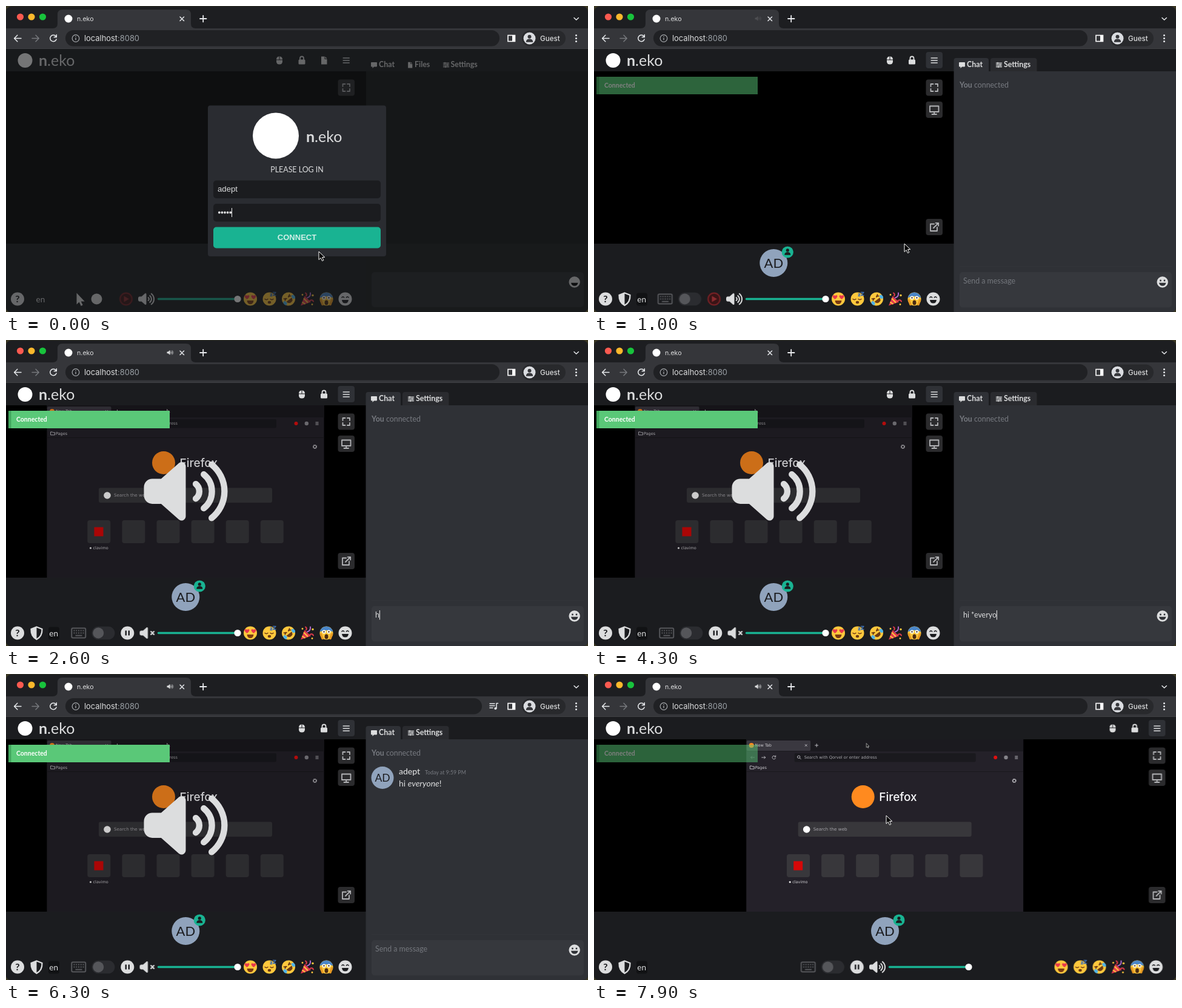
Recreate the animation shown at these times as an HTML page. Size 960 by 506 pixels, loop 8 s.

```html
<!DOCTYPE html>
<html lang="en">
<head>
<meta charset="utf-8">
<title>n.eko</title>
<style>
html, body { margin: 0; height: 100%; overflow: hidden; background: #1a1b1e; }
svg.stage { display: block; width: 100vw; height: 100vh; }
text { font: 12.4px Lato, sans-serif; fill: #dcddde; white-space: pre; }
.ui { font-family: Inter, sans-serif; }
.arial { font-family: "Liberation Sans", Arial, sans-serif; }
.ff text { font: 6.5px "DejaVu Sans", sans-serif; fill: #d0cfd3; }
.b { font-weight: 700; }
.line { fill: none; stroke-linecap: round; stroke-linejoin: round; }

.pre, .live, .video, .mute, .loud, .wait, .chat, .right, .mid, .keys, .vol,
.audio, .media, .sent, .arrow, .hand { animation: 8s step-end infinite; }
.pre { animation-name: pre; }
.live { animation-name: live; }
.video { animation-name: video; }
.wait { animation-name: wait; }
.mute { animation-name: mute; }
.loud { animation-name: loud; }
.chat { animation-name: chat; }
.right { animation-name: right; }
.mid { animation-name: mid; }
.keys { animation-name: keys; }
.vol { animation-name: vol; }
.audio { animation-name: audio; }
.media { animation-name: media; }
.sent { animation-name: sent; }
.arrow { animation-name: arrow; }
.hand { animation-name: hand; }
.toast { animation: toast 8s linear infinite; }
.cursor { animation: move 8s ease-in-out infinite; }

@keyframes pre { 0% { opacity: 1 } 10.625%, 100% { opacity: 0 } }
@keyframes live { 0% { opacity: 0 } 10.625%, 100% { opacity: 1 } }
@keyframes video { 0% { opacity: 0 } 18.125%, 100% { opacity: 1 } }
@keyframes wait { 0% { opacity: 1 } 18.125%, 100% { opacity: 0 } }
@keyframes mute { 0%, 95.625%, 100% { opacity: 0 } 18.125% { opacity: 1 } }
@keyframes loud { 0%, 95.625%, 100% { opacity: 1 } 18.125% { opacity: 0 } }
@keyframes chat { 0% { opacity: 1 } 89.375%, 100% { opacity: 0 } }
@keyframes right { 0% { transform: none } 89.375%, 100% { transform: translateX(367.5px) } }
@keyframes mid { 0% { transform: none } 89.375%, 100% { transform: translateX(183.7px) } }
@keyframes keys {
  0% { transform: translateX(-2.5px) }
  18.125% { transform: none }
  89.375% { transform: translateX(235px) }
  95.625%, 100% { transform: translateX(233.5px) }
}
@keyframes vol {
  0% { transform: none }
  89.375% { transform: translateX(235px) }
  95.625%, 100% { transform: translateX(236px) }
}
@keyframes audio {
  0% { opacity: 0 } 11.875% { opacity: .15 } 13.125% { opacity: 1 }
  36.875% { opacity: 0 } 68.125%, 100% { opacity: 1 }
}
@keyframes media { 0%, 85.625%, 100% { opacity: 0 } 68.125% { opacity: 1 } }
@keyframes sent { 0% { opacity: 0 } 68.125%, 100% { opacity: 1 } }
@keyframes toast { 0%, 11.25%, 100% { opacity: 0 } 13.75%, 97.5% { opacity: 1 } }
@keyframes arrow { 0%, 81.25%, 91.25%, 100% { opacity: 1 } 31.25%, 86.875% { opacity: 0 } }
@keyframes hand { 0%, 91.25%, 100% { opacity: 0 } 86.875% { opacity: 1 } }
@keyframes move {
  0% { transform: translate(516px, 406px) }
  3.5%, 15% { transform: translate(512px, 393px) }
  27%, 81.25% { transform: translate(640px, 452px) }
  87.5%, 90.2% { transform: translate(565px, 95px) }
  94.5%, 100% { transform: translate(482px, 234px) }
}
</style>
</head>
<body>
<svg class="stage" viewBox="0 0 960 506" preserveAspectRatio="none">
<defs>
  <path id="cone" d="M320 64c0-12.6-7.4-24-18.9-29.2s-25-3.1-34.4 5.3L131.8 160H64c-35.3 0-64 28.7-64 64v64c0 35.3 28.7 64 64 64h67.8l134.9 119.9c9.4 8.4 22.9 10.4 34.4 5.3S320 460.6 320 448z"/>
  <g id="speaker" fill="#dcddde" stroke="#dcddde" stroke-width="0">
    <use href="#cone"/>
    <path class="line" stroke-width="48" d="M397 200a72 72 0 0 1 0 112M458 126a167 167 0 0 1 0 260M518 51a263 263 0 0 1 0 410"/>
  </g>
  <g id="muted" fill="#dcddde" stroke="#dcddde" stroke-width="0">
    <use href="#cone"/>
    <path class="line" stroke-width="52" d="M442 199l114 114m0-114L442 313"/>
  </g>
  <g id="person"><circle cy="-2.4" r="2.6"/><path d="M-5 5.4q0-4.6 5-4.6t5 4.6z"/></g>
  <g id="mouse"><rect x="-5" y="-6.5" width="10" height="13" rx="4.5"/><path d="M-5-1H5M0-6.5V-1" stroke="#1a1b1e"/></g>
  <g id="lock"><rect x="-5.5" y="-1.5" width="11" height="8" rx="1.5"/><path class="line" d="M-3-1v-2.5a3 3 0 0 1 6 0V-1" stroke="#dcddde" stroke-width="1.8"/></g>
  <path id="file" d="M-4.5-6.5H1V-2H5V6.5H-4.5zM2-6.5L5-3H2z"/>
  <path id="menu" class="line" d="M-5-4H5M-5 0H5M-5 4H5" stroke="#dcddde" stroke-width="1.6"/>
  <path id="bubble" d="M-4-4.5h8q1 0 1 1v5.500q0 1-1 1H0L-2.500 5.500V3H-4q-1 0-1-1v-5.500q0-1 1-1z"/>
  <path id="sliders" class="line" d="M-4.500-3h9m-9 3h9m-9 3h9M-2-4v2M2-1v2M-1 2v2" stroke="#dcddde" stroke-width="1.400"/>
  <circle id="face" r="11" fill="#ffc83d"/>
  <g id="grin">
    <path d="M-5.500 1.500H5.500q-.5 5.500-5.500 5.500T-5.500 1.500z"/>
    <path class="line" stroke-width="1.600" d="M-5.500-2.500q1.800-2.500 3.600 0M1.900-2.500q1.800-2.500 3.600 0"/>
  </g>
  <path id="heart" d="M0 4.500C-6 .5-4.500-4 0-1.500 4.500-4 6 .5 0 4.500z" fill="#e8384b"/>
</defs>

<rect width="960" height="506" fill="#3b3824"/>
<rect width="960" height="506" y=".5" rx="9" fill="#1d1e21"/>

<!-- browser chrome -->
<circle cx="23.500" cy="18" r="5.600" fill="#fb5a50"/>
<circle cx="42" cy="18" r="5.600" fill="#fbb82c"/>
<circle cx="60.500" cy="18" r="5.600" fill="#18c33c"/>
<path d="M0 37H77q8 0 8-8V14q0-8 8-8H297q8 0 8 8v15q0 8 8 8H960V70H0z" fill="#35363a"/>
<circle cx="103" cy="21" r="6.500" fill="#fff"/>
<text class="ui" x="117" y="25" font-size="11" style="font-size:10.700px">n.eko</text>
<g class="audio"><use href="#speaker" transform="translate(265.500 16.500) scale(.0165)"/></g>
<g class="line" stroke="#e8eaed" stroke-width="1.500">
  <path d="M287 18l6.500 6.500m0-6.500L287 24.500"/>
  <path d="M320 21h10.500M325.200 15.800v10.500" stroke-width="1.800"/>
  <path d="M937 19.500l3.700 3.500 3.700-3.500"/>
  <path d="M25 53.500H14M18.800 48.300L13.600 53.500l5.200 5.200"/>
  <path d="M43 53.500H54M49 48.300l5.200 5.200L49 58.700" stroke="#77797d"/>
  <path d="M82.200 50a5.300 5.300 0 1 0 .9 5M83.300 47.500v4h-4"/>
</g>
<rect x="98" y="40" width="716" height="26.500" rx="13.200" fill="#202124"/>
<g class="media">
  <rect x="770" y="40" width="46" height="27" fill="#35363a"/>
  <path d="M770 40h1.800a13.250 13.250 0 0 1 0 26.500H770z" fill="#202124"/>
  <path class="line" stroke="#e8eaed" stroke-width="1.500" d="M798 49h8m-8 3.500h8M798 56h5M809 57v-8.500h2.500"/>
  <circle cx="807.300" cy="57" r="2" fill="#e8eaed"/>
</g>
<circle cx="115" cy="53.500" r="5.800" fill="none" stroke="#a5a8ac" stroke-width="1.200"/>
<path d="M115 52.800v3.500M115 50v1.300" stroke="#a5a8ac" stroke-width="1.400"/>
<text class="ui" x="129" y="58" style="font-size:12.900px">localhost<tspan fill="#9aa0a6">:8080</tspan></text>
<rect x="828" y="48.500" width="11.500" height="10" fill="none" stroke="#fff" stroke-width="1.600"/>
<rect x="835" y="48" width="5" height="11" fill="#fff"/>
<rect x="851" y="40.500" width="72" height="26" rx="13" fill="#28292c"/>
<circle cx="863.500" cy="53.500" r="10" fill="#dadce0"/>
<use href="#person" transform="translate(863.500 53.500) scale(1.150)" fill="#35363a"/>
<text class="ui" x="881" y="58" style="font-size:11.600px;font-weight:500">Guest</text>
<g fill="#e8eaed"><circle cx="940.500" cy="48.500" r="1.500"/><circle cx="940.500" cy="53.500" r="1.500"/><circle cx="940.500" cy="58.500" r="1.500"/></g>

<!-- page -->
<path d="M0 70H960V497q0 9-9 9H9q-9 0-9-9z" fill="#1b1c1f"/>
<path d="M0 70.500H960" stroke="#3f4044"/>
<circle cx="31.500" cy="90" r="12" fill="#fff"/>
<text x="54" y="98.500" style="font-size:25px"><tspan class="b">n</tspan>.eko</text>
<rect y="108" width="960" height="285" fill="#000"/>

<g class="right" fill="#dcddde">
  <g class="live">
    <use href="#mouse" x="488" y="90"/>
    <use href="#lock" x="524.500" y="90"/>
    <rect x="547.500" y="76" width="27.500" height="27" rx="4" fill="#2f3136"/>
  </g>
  <use href="#menu" x="561.200" y="90"/>
</g>

<g class="video">
  <g class="mid ff">
    <rect x="67.500" y="108" width="457" height="285" fill="#242129"/>
    <rect x="67.500" y="108" width="457" height="20" fill="#1b1a1f"/>
    <path d="M67.500 161.500h457" stroke="#19181c"/>
    <rect x="68" y="110" width="105.500" height="17" rx="2" fill="#3a3840"/>
    <circle cx="76" cy="118" r="4" fill="#ff8a1f"/>
    <text x="82" y="120.300">New Tab</text>
    <g class="line" stroke="#c8c7cc" stroke-width=".9">
      <path d="M164.500 116.500l3 3m0-3l-3 3M181 118h5M183.500 115.500v5"/>
      <path d="M75 138h6M77 136l-2 2 2 2" stroke="#66646c"/>
      <path d="M93 138h6M97 136l2 2-2 2M115.500 136.500a2.800 2.800 0 1 0 .3 2.500M116 135v2h-2"/>
    </g>
    <rect x="147" y="131" width="299" height="14.500" rx="2" fill="#1a191e"/>
    <path class="line" stroke="#c8c7cc" stroke-width=".9" d="M151.800 137.200a2.200 2.200 0 1 1 4.400 0 2.200 2.200 0 0 1-4.400 0M155.600 138.800l2 2"/>
    <text x="163" y="140.300" style="font-size:6.650px;fill:#aaa9ae">Search with Qorvel or enter address</text>
    <circle cx="478.500" cy="138" r="3" fill="#e01010"/>
    <circle cx="495.800" cy="138" r="3.200" fill="#85848a"/>
    <path d="M510.500 136h5m-5 2h5m-5 2h5" stroke="#c8c7cc" stroke-width=".8"/>
    <path class="line" stroke="#c8c7cc" stroke-width=".9" d="M74 152h2.500l1 1H80.500v4H74z"/>
    <text x="82" y="156.800">Pages</text>
    <circle cx="509.500" cy="176.500" r="2.700" fill="none" stroke="#c8c7cc" stroke-width="1.800" stroke-dasharray="1.300 .8"/>
    <circle cx="509.500" cy="176.500" r="2.200" fill="none" stroke="#c8c7cc" stroke-width=".8"/>
    <circle cx="260" cy="203" r="19" fill="#ff8a1f"/>
    <text x="286.500" y="209.800" style="font:500 19px Inter,sans-serif;fill:#fbfbfe">Firefox</text>
    <rect x="153" y="244.500" width="286" height="24.500" rx="3" fill="#38373b"/>
    <circle cx="167" cy="257" r="5.800" fill="#fff"/>
    <text x="178" y="259.300" style="font-size:7.200px;fill:#a5a4a9">Search the web</text>
    <g id="tiles" fill="#38373b"></g>
    <rect x="145.500" y="309.500" width="15" height="15" fill="#d50808"/>
    <circle cx="139.500" cy="344" r="1.600" fill="#eee"/>
    <text x="143.500" y="346">clavimo</text>
    <path d="M265.500 114.500v7l1.700-1.500 1 2.300 1-.5-1-2.200h2z" fill="#111" stroke="#ccc" stroke-width=".7"/>
    <g class="mute">
      <rect x="67.500" y="108" width="457" height="285" opacity=".2"/>
      <use href="#speaker" transform="translate(227.500 195) scale(.2156)"/>
    </g>
  </g>
</g>

<g class="right">
  <g fill="#2b2b2d">
    <rect x="547.500" y="121.500" width="27.500" height="27" rx="4"/>
    <g class="live">
      <rect x="547.500" y="158" width="27.500" height="27" rx="4"/>
      <rect x="547.500" y="352" width="27.500" height="27" rx="4"/>
    </g>
  </g>
  <g class="line" stroke="#b4b5b8" stroke-width="1.800">
    <path d="M555.500 133v-4h4m3.500 0h4v4m0 4v4h-4m-3.500 0h-4v-4"/>
    <g class="live">
      <path d="M554 165.500h14.500v9.500H554zM561.200 175.500v3M557.500 179h7.500"/>
      <path d="M561 360.500h-6v11.500h11v-6M560 367l8-8M563.500 358.800h4.700v4.700"/>
    </g>
  </g>
</g>

<g class="live"><g class="mid">
  <circle cx="296.300" cy="425" r="23" fill="#90a3bc"/>
  <text x="296.300" y="433" text-anchor="middle" style="font-size:22px;fill:#1a1b1e">AD</text>
  <circle cx="319.300" cy="407" r="9.600" fill="#19b392"/>
  <use href="#person" x="319.300" y="406.300" fill="#1b1c1f"/>
</g></g>

<!-- control bar -->
<circle cx="19" cy="484.500" r="11" fill="#dcddde"/>
<text class="b" x="19" y="490" text-anchor="middle" style="font-size:16px;fill:#1a1b1e">?</text>
<g class="live">
  <path d="M50.500 474.500l9 3.500q.5 12-9 17-9.500-5-9-17z" fill="none" stroke="#dcddde" stroke-width="2.200"/>
  <path d="M50.500 474.500v20.500q-9.500-5-9-17z" fill="#dcddde"/>
  <rect x="70" y="474.500" width="18" height="21" rx="4" fill="#111214"/>
  <text x="71.300" y="489.500" style="font-size:13.600px">en</text>
</g>
<g class="keys">
  <g class="live">
    <rect x="108.300" y="476.500" width="23" height="16" rx="2" fill="none" stroke="#56575b" stroke-width="2"/>
    <path d="M111.500 480.500h17m-17 4h17" stroke="#56575b" stroke-width="2" stroke-dasharray="2 1.750"/>
    <path d="M114.500 488.700h11" stroke="#56575b" stroke-width="2"/>
    <rect x="141.500" y="473.800" width="38" height="21.500" rx="10.700" fill="#2b2c30"/>
    <circle cx="152.300" cy="484.500" r="9" fill="#55565a"/>
  </g>
  <g class="wait">
    <circle cx="200.500" cy="484.500" r="9.800" fill="#3a1416" stroke="#742125" stroke-width="2.200"/>
    <path d="M197 479.500l8.500 5-8.500 5z" fill="#8a2b2f"/>
  </g>
  <g class="video">
    <circle cx="200.300" cy="484.500" r="11" fill="#dcddde"/>
    <path d="M197.800 480.500v8m5-8v8" stroke="#1a1b1e" stroke-width="2.400"/>
  </g>
</g>
<g class="vol">
  <g class="loud"><use href="#speaker" transform="translate(218 473.700) scale(.0422)"/></g>
  <g class="mute"><use href="#muted" transform="translate(220.500 473.700) scale(.0422)"/></g>
  <path class="line" d="M251.500 484.500H380" stroke="#19b392" stroke-width="3.400"/>
  <circle cx="382" cy="484.500" r="5.600" fill="#fff"/>
</g>
<g class="right">
  <g transform="translate(403 484.500)">
    <use href="#face"/><path d="M-5.500 2.500h11q-.8 6-5.500 6t-5.500-6z" fill="#7a3a12"/>
    <use href="#heart" x="-5.500" y="-4"/><use href="#heart" x="5.500" y="-4"/>
  </g>
  <g transform="translate(434.500 484.500)">
    <use href="#face"/><path class="line" stroke="#6b3a14" stroke-width="1.500" d="M-7.500 0q2.500 2.200 5 0M1.500 0q2.500 2.200 5 0"/>
    <ellipse cy="5.500" rx="2.700" ry="2.200" fill="#6b3a14"/>
    <path class="line" stroke="#3d6fb4" stroke-width="1.400" d="M6-11h4.500L6-6h4.500M1.500-8.500h3L1.500-5h3"/>
  </g>
  <g transform="translate(466 484.500) rotate(-38)">
    <use href="#face"/><use href="#grin" fill="#6b3a14" stroke="#6b3a14" stroke-width="0"/>
    <ellipse cx="-8.500" cy="2" rx="2.600" ry="3.600" fill="#4fb3e8"/><ellipse cx="8.500" cy="2" rx="2.600" ry="3.600" fill="#4fb3e8"/>
    <path class="line" stroke="#6b3a14" stroke-width="1.500" d="M-6-5l3.500 2-3.500 1.500M6-5L2.500-3 6-1.500"/>
  </g>
  <g transform="translate(497 484.500)">
    <path d="M-11 11L-4.500-5 6 5z" fill="#e03a4d"/><path d="M-8.500 5l5 3.500M-6-1l7 7" stroke="#ffc83d" stroke-width="2"/>
    <path class="line" stroke-width="2" stroke="#e03a4d" d="M-2-5q2-3-1-5M4 3q4-3 6 1"/>
    <path class="line" stroke-width="2" stroke="#b06ad0" d="M0-2Q6-4 5-10"/>
    <g fill="#ffc83d"><circle cx="9" cy="-6" r="1.700"/><circle cx="-8" cy="-7" r="1.400"/><circle cx="8" cy="9" r="1.400"/></g>
  </g>
  <g transform="translate(528.500 484.500)">
    <use href="#face"/><path d="M-10.800-2a11 11 0 0 1 21.600 0Q0-7-10.800-2z" fill="#4a86c8"/>
    <g fill="#fff"><circle cx="-4" cy="-2" r="3"/><circle cx="4" cy="-2" r="3"/></g>
    <g fill="#4a2a12"><circle cx="-4" cy="-2" r="1.200"/><circle cx="4" cy="-2" r="1.200"/><ellipse cy="6" rx="3" ry="4"/></g>
    <path class="line" stroke="#e89a22" stroke-width="3.600" d="M-9 2l2.500 7M9 2L6.500 9"/>
  </g>
  <g transform="translate(559.500 484.500)">
    <circle r="11" fill="#dcddde"/><use href="#grin" fill="#1a1b1e" stroke="#1a1b1e" stroke-width="0"/>
  </g>
</g>

<!-- chat -->
<g class="chat">
  <g class="live">
    <path d="M593.500 108V90q0-4 4-4H647q4 0 4 4v18H960V497q0 9-9 9H593.500z" fill="#2f3136"/>
    <path d="M654 108V90q0-4 4-4h68.500q4 0 4 4v18z" fill="#2a2b2f"/>
    <use href="#bubble" x="607" y="97.500" fill="#dcddde"/>
    <text class="b" x="615" y="101.300">Chat</text>
    <use href="#sliders" x="668" y="97.500"/>
    <text class="b" x="676" y="101.300">Settings</text>
    <text x="603" y="135" style="fill:#777a80"><tspan class="b">You</tspan> connected</text>
    <path d="M603 430.500H953" stroke="#33353a"/>
    <rect x="603" y="440" width="350" height="58.500" rx="5" fill="#36383d"/>
    <text id="hint" x="609" y="459.200" style="fill:#74777d">Send a message</text>
    <text id="draft" x="609" y="459.200"></text>
    <rect id="caret" y="447" width="1" height="15.500" fill="#eee"/>
    <g class="sent">
      <circle cx="621" cy="171.500" r="18.500" fill="#90a3bc"/>
      <text x="621" y="178" text-anchor="middle" style="font-size:17.500px;fill:#1a1b1e">AD</text>
      <text x="648" y="166" style="font-size:14px;font-weight:500">adept</text>
      <text x="691" y="166" style="font-size:8.800px;fill:#777a80">Today at 9:59 PM</text>
      <text x="648" y="186" style="font-size:13.900px">hi <tspan font-style="italic">everyone</tspan>!</text>
    </g>
  </g>
  <circle cx="937.700" cy="456.500" r="9.200" fill="#dcddde"/>
  <g fill="#2f3136"><circle cx="934.500" cy="454" r="1.400"/><circle cx="941" cy="454" r="1.400"/><path d="M932 457.800h11.500q-1 5-5.700 5t-5.800-5z"/></g>
</g>

<g class="toast">
  <rect x="4" y="117" width="266" height="29" fill="#5ac878"/>
  <rect x="4" y="117" width="4.500" height="29" fill="#42a85f"/>
  <text class="b" x="17" y="135.200" style="font-size:10.500px;fill:#fff">Connected</text>
</g>

<!-- login -->
<g class="pre">
  <path d="M594 108H960V497q0 9-9 9H594z" fill="#1c1d20" opacity=".7"/>
  <g fill="#dcddde">
    <use href="#mouse" x="451" y="90"/><use href="#lock" x="488" y="90"/><use href="#file" x="524.500" y="90"/>
    <use href="#bubble" x="607" y="97.500"/><use href="#file" transform="translate(666.500 97.500) scale(.75)"/><use href="#sliders" x="726" y="97.500"/>
    <path d="M116.500 474.500v19l4.200-4 3 6.500 3-1.400-3-6.200h6z"/>
    <circle cx="149.500" cy="484.500" r="9"/>
  </g>
  <text class="b" x="615" y="101.300">Chat</text><text class="b" x="674" y="101.300">Files</text><text class="b" x="733.500" y="101.300">Settings</text>
  <text x="49.500" y="489.500" style="font-size:13.600px">en</text>
  <rect x="603" y="440" width="350" height="58" rx="5" fill="#26272b"/>
  <circle cx="937.700" cy="456.500" r="9.200" fill="#dcddde"/>
  <path d="M932 457.800h11.500q-1 5-5.700 5t-5.800-5z"/>
  <path d="M0 71H960V497q0 9-9 9H9q-9 0-9-9z" fill="#18191c" opacity=".6"/>
  <rect x="333" y="164.500" width="294" height="249.500" rx="4" fill="#2a2c31"/>
  <circle cx="445" cy="214.500" r="38" fill="#fff"/>
  <text x="495" y="225" style="font-size:25px"><tspan class="b">n</tspan>.eko</text>
  <text x="480" y="274.500" text-anchor="middle">PLEASE LOG IN</text>
  <rect x="342" y="288.500" width="276" height="29.500" rx="5" fill="#1b1c1f"/>
  <rect x="342" y="327" width="276" height="29.500" rx="5" fill="#1b1c1f"/>
  <text class="arial" x="349" y="307" style="font-size:13.200px">adept</text>
  <path class="line" d="M351.800 341.500h19" stroke="#dcddde" stroke-width="3.800" stroke-dasharray="0 4.600"/>
  <rect x="372" y="334" width="1" height="15" fill="#eee"/>
  <rect x="342" y="365.500" width="276" height="35" rx="5" fill="#19b392"/>
  <text class="arial b" x="480" y="387.300" text-anchor="middle" style="font-size:13px;fill:#cfeee6">CONNECT</text>
</g>

<g class="cursor" stroke="#fff" stroke-linejoin="round">
  <path class="arrow" d="M0 0v13.500l3.200-3 2.300 5 2.300-1-2.200-5h4.200z"/>
  <path class="hand" d="M-1-.5q1.500-1.200 2.300.5l1 4.500 5.200.6q1.800.4 1.500 2.400l-.8 4.500H1.500L-3 7.500q-.3-1.600 1.500-1l1.300 1z" fill="#fff" stroke="#222" stroke-width=".8"/>
</g>
</svg>
<script>
const get = id => document.getElementById(id);
const hint = get('hint'), draft = get('draft'), caret = get('caret');

for (let i = 0; i < 6; i++) {
  const tile = document.createElementNS('http://www.w3.org/2000/svg', 'rect');
  const box = { x: 134.3 + i * 57.1, y: 298, width: 38, height: 38, rx: 4 };
  for (const k in box) tile.setAttribute(k, box[k]);
  get('tiles').append(tile);
}

const message = 'hi *everyone*!';
const strokes = [2550, 2750, 2850, 3450, 3600, 3720, 3850, 3950, 4080, 4250, 4450, 4580, 4750, 5050];
const sendAt = 5450;
let start, shown = -1;

function frame(now) {
  start ??= now;
  const t = (now - start) % 8000;
  const n = t < sendAt ? strokes.filter(s => s <= t).length : 0;
  if (n !== shown) {
    shown = n;
    draft.textContent = message.slice(0, n);
    hint.style.display = n ? 'none' : '';
    caret.style.display = n ? '' : 'none';
    caret.setAttribute('x', 609 + draft.getComputedTextLength());
  }
  requestAnimationFrame(frame);
}
requestAnimationFrame(frame);
</script>
</body>
</html>
```
